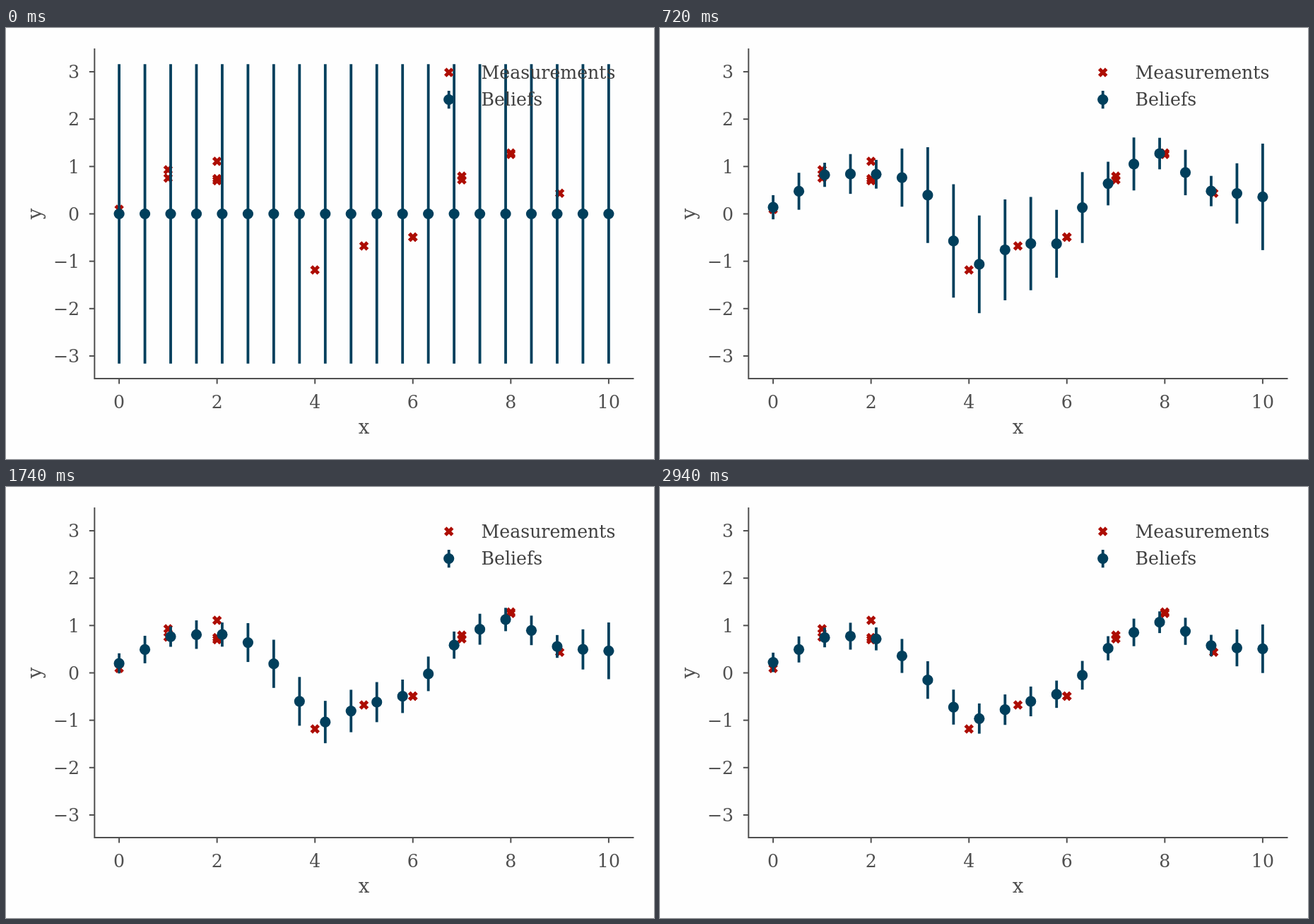
An HTML page for the animation above (3000 ms loop, 917x611 px).

```html
<!DOCTYPE html>
<html lang="en">
<head>
<meta charset="utf-8">
<title>Belief propagation</title>
<style>
  html, body { margin: 0; width: 100%; height: 100%; overflow: hidden; background: #fefefe; }
  svg { display: block; font: 25.2px "DejaVu Serif", "Noto Serif", serif; fill: #4f4f4f; }
  .axis { stroke: #4f4f4f; stroke-width: 2; fill: none; }
  .label { font-size: 27.7px; }
  .legend { fill: #404040; }
  .cross { stroke: #ad0d02; stroke-width: 5; }
  .bar { stroke: #003f5c; stroke-width: 3.8; }
  .dot { fill: #003f5c; }
</style>
</head>
<body>
<svg id="chart" width="917" height="611" viewBox="0 0 917 611"></svg>
<script>
const chart = document.getElementById('chart');
const px = x => 160.1 + 69.28 * x;
const py = y => 263.5 - 67.15 * y;

function add(tag, attrs, text = '') {
  const el = document.createElementNS('http://www.w3.org/2000/svg', tag);
  for (const key in attrs) el.setAttribute(key, attrs[key]);
  el.textContent = text;
  return chart.appendChild(el);
}
const path = (cls, d) => add('path', { class: cls, d });
const text = (x, y, str, anchor, cls = '') =>
  add('text', { x, y, 'text-anchor': anchor, class: cls }, str);
const cross = (x, y) => path('cross', `M${x - 5} ${y - 5}l10 10m0 -10l-10 10`);
const dot = (cx, cy) => add('circle', { class: 'dot', cx, cy, r: 7.6 });

// Heights measured at each x
const measured = [
  [0, [0.095]], [1, [0.93, 0.755]], [2, [1.11, 0.745, 0.7]],
  [4, [-1.185]], [5, [-0.678]], [6, [-0.49, -0.49]],
  [7, [0.795, 0.72]], [8, [1.285, 1.255]], [9, [0.435]]
];

// Gaussian belief propagation on a chain of nodes
const NODES = 20, STEPS = 50, STEP_MS = 60;
const PRIOR = 0.1, SMOOTH_VAR = 0.1, HEIGHT_VAR = 0.05, DAMPING = 0.9;
const gap = 10 / (NODES - 1);

const factor = (i, coef, y, variance, updates) => ({
  i, coef, y, variance, gain: 1 - DAMPING ** updates,
  msgs: [{ eta: 0, lam: 0 }, { eta: 0, lam: 0 }]
});
const factors = [];
for (let i = 0; i < NODES - 1; i++) factors.push(factor(i, [-1, 1], 0, SMOOTH_VAR, 1));
for (const [x, ys] of measured) {
  const i = Math.floor(x / gap), g = x / gap - i;
  const mean = ys.reduce((a, b) => a + b) / ys.length;
  factors.push(factor(i, [1 - g, g], mean, HEIGHT_VAR, ys.length));
}

const priors = () => Array.from({ length: NODES }, () => ({ eta: 0, lam: PRIOR }));

function propagate(beliefs) {
  const next = priors();
  for (const f of factors) {
    f.msgs = f.msgs.map((old, side) => {
      const other = 1 - side, belief = beliefs[f.i + other], back = f.msgs[other];
      const lam = belief.lam - back.lam, mean = (belief.eta - back.eta) / lam;
      const a = f.coef[side], b = f.coef[other];
      const variance = f.variance + b * b / lam;
      return {
        eta: old.eta + f.gain * (a * (f.y - b * mean) / variance - old.eta),
        lam: old.lam + f.gain * (a * a / variance - old.lam)
      };
    });
    f.msgs.forEach((m, side) => {
      next[f.i + side].eta += m.eta;
      next[f.i + side].lam += m.lam;
    });
  }
  return next;
}

const history = [priors()];
while (history.length < STEPS) history.push(propagate(history[history.length - 1]));

// Measurements below the beliefs, axes and legend above
for (const [x, ys] of measured) for (const y of ys) cross(px(x), py(y));

const marks = Array.from({ length: NODES }, (_, i) => ({ x: px(i * gap), bar: path('bar', '') }));
for (const m of marks) m.dot = dot(m.x, 0);

path('axis', 'M125.3 29V497H888.5');
for (let x = 0; x <= 10; x += 2) {
  path('axis', `M${px(x)} 497v7.5`);
  text(px(x), 539, x, 'middle');
}
for (let y = -3; y <= 3; y++) {
  path('axis', `M125.3 ${py(y)}h-7.5`);
  text(104, py(y) + 9.2, String(y).replace('-', '\u2212'), 'end');
}
text(506.5, 575, 'x', 'middle', 'label');
text(0, 0, 'y', 'middle', 'label').setAttribute('transform', 'translate(49.5 263.5) rotate(-90)');

cross(626.7, 63);
path('bar', 'M626.7 89V114.3');
dot(626.7, 101.5);
text(672.5, 72, 'Measurements', 'start', 'legend');
text(672.5, 110.3, 'Beliefs', 'start', 'legend');

function draw(now) {
  const beliefs = history[Math.floor(now / STEP_MS) % STEPS];
  marks.forEach((m, i) => {
    const { eta, lam } = beliefs[i], mean = eta / lam, sd = 1 / Math.sqrt(lam);
    m.bar.setAttribute('d', `M${m.x} ${py(mean + sd)}V${py(mean - sd)}`);
    m.dot.setAttribute('cy', py(mean));
  });
}

let start;
function tick(now) {
  start ??= now;
  draw(now - start);
  requestAnimationFrame(tick);
}
draw(0);
requestAnimationFrame(tick);
</script>
</body>
</html>
```
